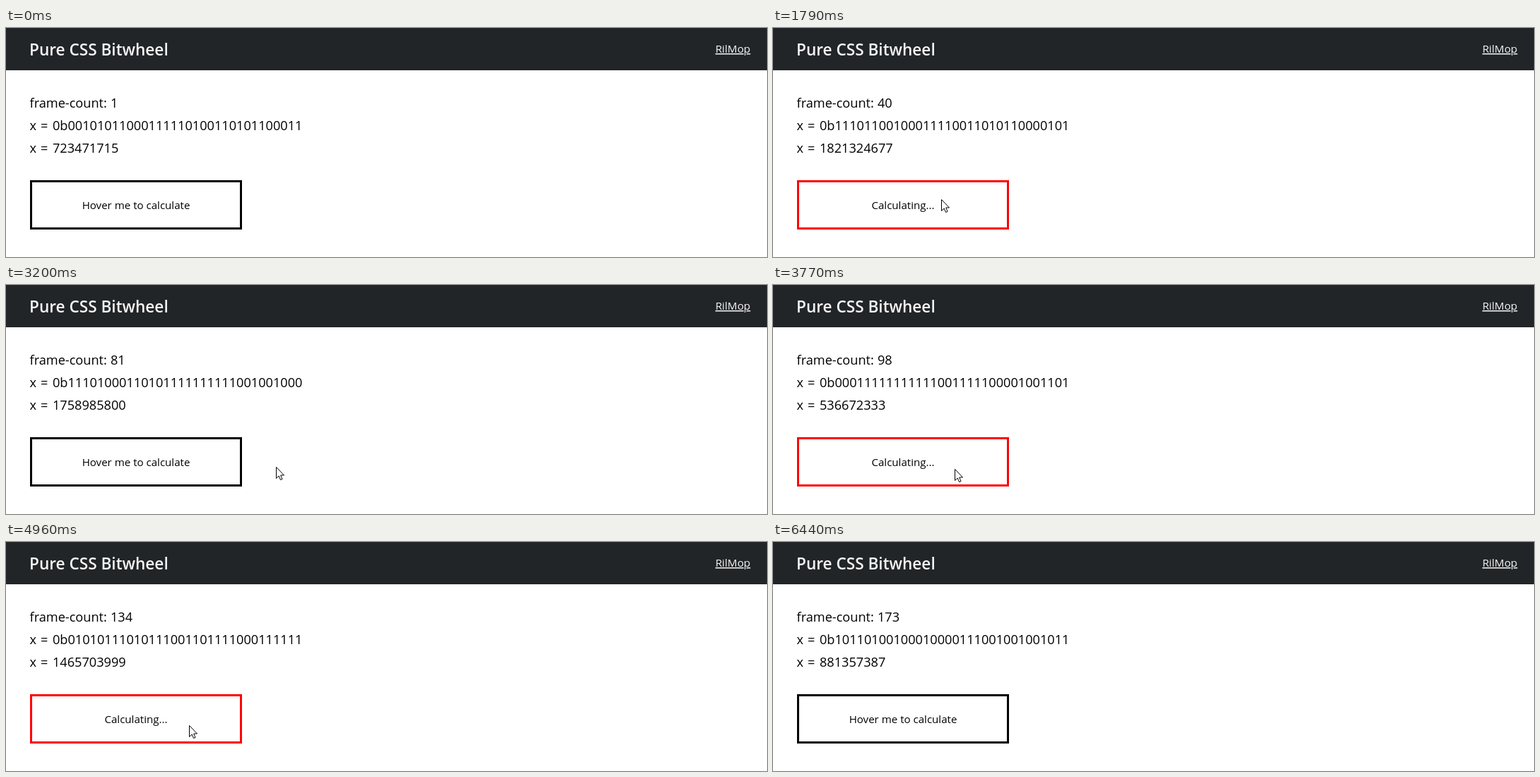
Animation, 1077 px wide and 325 px high, one loop 6.51 s. Source, as an HTML page:

```html
<!DOCTYPE html>
<html lang="en">
<head>
<meta charset="utf-8">
<title>CSS random numbers</title>
<style>
  html, body { margin: 0; width: 100%; height: 100%; overflow: hidden; background: #fff; }
  svg { display: block; font: 18.15px "Open Sans", "Noto Sans", sans-serif; }
  .title { font-size: 22.6px; font-weight: 600; fill: #f5f5f5; }
  .link { font-size: 15.3px; fill: #f5f5f5; text-anchor: end; text-decoration: underline; }
  .label { font-size: 15.1px; text-anchor: middle; }
  #box { fill: #fff; stroke-width: 3; }
</style>
</head>
<body>
<svg width="1077" height="325" viewBox="0 0 1077 325">
  <rect width="1077" height="60" fill="#222528"/>
  <text class="title" x="33" y="39">Pure CSS Bitwheel</text>
  <text class="link" x="1053.5" y="35">RilMop</text>
  <text x="33.5" y="113">frame-count:</text><text id="count" x="148" y="113"></text>
  <text x="33.5" y="145">x</text><text x="49" y="145">=</text><text id="bin" x="66" y="145"></text>
  <text x="33.5" y="177">x</text><text x="49" y="177">=</text><text id="dec" x="66" y="177"></text>
  <rect id="box" x="35.5" y="217.5" width="297" height="67"/>
  <text id="label" class="label" x="184" y="257"></text>
  <path id="cursor" d="M.5.5V16.5L4.2 13 6.5 18.5 9 17.5 6.7 12H11.5Z" fill="#fff" stroke="#000"/>
</svg>
<script>
const LOOP = 6510, ENTER = 320, LEAVE = 6400, STEP = 70.4;
const $ = id => document.getElementById(id);
const linear = p => p;
const smooth = p => p * p * (3 - 2 * p);

// [time, count]
const counts = [[440, 1], [2500, 60], [6270, 173]];

// [time, x, y] of the pointer tip: enter, rest, slip out and back, leave
const path = [
  [320, 759, 297], [510, 237, 243], [2840, 238, 243], [3160, 382, 258], [3400, 382, 259],
  [3700, 257, 261], [4400, 257, 261], [4700, 259, 260], [6130, 259, 260], [6370, 764, 303]
];

function at(keys, t, ease) {
  const next = keys.findIndex(k => k[0] > t);
  const b = keys.at(next), a = keys[next - 1] || b;
  const p = a === b ? 0 : ease(Math.min(1, (t - a[0]) / (b[0] - a[0])));
  return a.slice(1).map((v, j) => Math.round(v + (b[j + 1] - v) * p));
}

// The picture holds still at first, then refreshes in even steps.
function snap(t) {
  return t < ENTER ? 0 : ENTER + STEP * Math.floor((t - ENTER) / STEP + 0.25);
}

function xorshift(n) {
  let x = 2463534242;
  while (n--) {
    x ^= x << 13;
    x ^= x >>> 17;
    x ^= x << 5;
  }
  return x >>> 0;
}

function draw(now) {
  const t = snap(now % LOOP);
  const [n] = at(counts, t, linear), [x, y] = at(path, t, smooth);
  const value = xorshift(n);
  const visible = t >= ENTER && t < LEAVE;
  const hover = visible && x < 334;

  $('count').textContent = n;
  $('bin').textContent = '0b' + value.toString(2).padStart(32, '0');
  $('dec').textContent = value & 0x7fffffff;
  $('label').textContent = hover ? 'Calculating...' : 'Hover me to calculate';
  $('box').setAttribute('stroke', hover ? '#f00' : '#000');
  $('cursor').setAttribute('transform', `translate(${x} ${y})`);
  $('cursor').setAttribute('visibility', visible ? 'visible' : 'hidden');
}

const begin = performance.now();
function tick() {
  draw(performance.now() - begin);
  requestAnimationFrame(tick);
}
tick();
</script>
</body>
</html>
```
